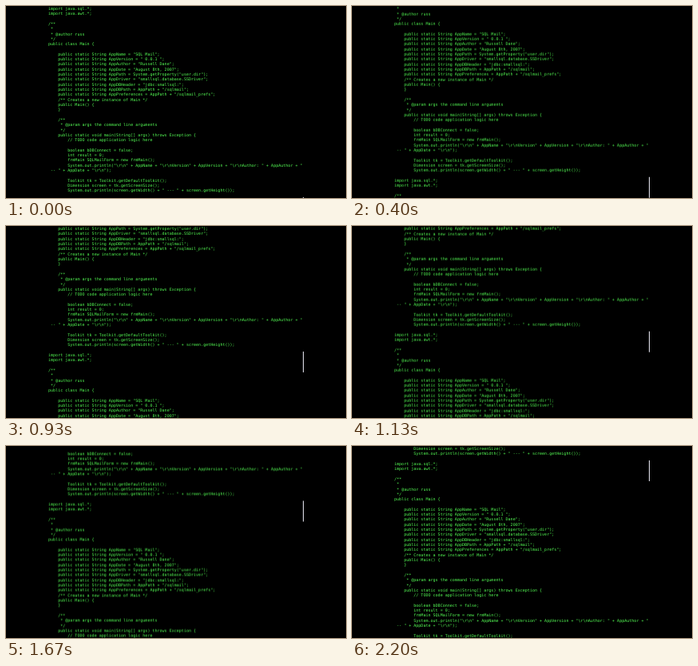
Write an HTML page that moves like this. It is 426x240 px and loops after 2.27 s.

```html
<!DOCTYPE html>
<html lang="en">
<head>
<meta charset="utf-8">
<title>Scrolling code</title>
<style>
  html, body { margin: 0; width: 100%; height: 100%; overflow: hidden; background: #000; }
  #stage { position: relative; width: 426px; height: 240px; overflow: hidden; background: #000; }
  #roll { position: absolute; left: 0; top: 0; width: 426px; height: 480px; }
  /* Set ten times larger and scaled down, so that letter widths stay fractional. */
  pre {
    position: absolute; left: 53.4px; top: 0; margin: 0;
    font: 50.4px/63.158px "DejaVu Sans Mono", monospace;
    font-variant-ligatures: none;
    text-rendering: geometricPrecision;
    color: #55ff55;
    transform: scale(.1); transform-origin: 0 0;
  }
  #bar { position: absolute; left: 372px; top: 239px; width: 1px; height: 26px; background: #e4e4f0; }
</style>
</head>
<body>
<div id="stage">
  <div id="roll"><pre id="code"></pre><div id="bar"></div></div>
</div>
<script>
const source = String.raw`import java.sql.*;
import java.awt.*;

/**
 *
 * @author russ
 */
public class Main {

    public static String AppName = "SQL Mail";
    public static String AppVersion = " 0.0.1 ";
    public static String AppAuthor = "Russell Dane";
    public static String AppDate = "August 8th, 2007";
    public static String AppPath = System.getProperty("user.dir");
    public static String AppDriver = "smallsql.database.SSDriver";
    public static String AppDBHeader = "jdbc:smallsql:";
    public static String AppDBPath = AppPath + "/sqlmail";
    public static String AppPreferences = AppPath + "/sqlmail_prefs";
    /** Creates a new instance of Main */
    public Main() {
    }

    /**
     * @param args the command line arguments
     */
    public static void main(String[] args) throws Exception {
        // TODO code application logic here

        boolean bDBConnect = false;
        int result = 0;
        frmMain SQLMailForm = new frmMain();
        System.out.println("\r\n" + AppName + "\r\nVersion" + AppVersion + "\r\nAuthor: " + AppAuthor + "
 -- " + AppDate + "\r\n");

        Toolkit tk = Toolkit.getDefaultToolkit();
        Dimension screen = tk.getScreenSize();
        System.out.println(screen.getWidth() + " --- " + screen.getHeight());

`;
document.getElementById("code").textContent = source + source;

const LOOP = 2270;
const ROW = 240 / 38;

// Rows scrolled by each tick; there are 15 ticks a second.
const rows = [
  0, 1, 1, 2, 3, 3, 4, 5, 6, 8, 9, 10, 11, 12, 13, 14, 16,
  17, 19, 20, 22, 23, 24, 25, 26, 27, 28, 29, 30, 32, 33, 34, 35, 35
];
const tickStart = i => Math.round(i * 20 / 3) * 10;
const shift = n => `translateY(${-n * ROW}px)`;

const frames = rows.map((n, i) => ({
  offset: tickStart(i) / LOOP,
  transform: shift(n),
  easing: "steps(1, end)"
}));
frames.push({ offset: 1, transform: shift(rows.at(-1)) });

document.getElementById("roll").animate(frames, { duration: LOOP, iterations: Infinity });
</script>
</body>
</html>
```
